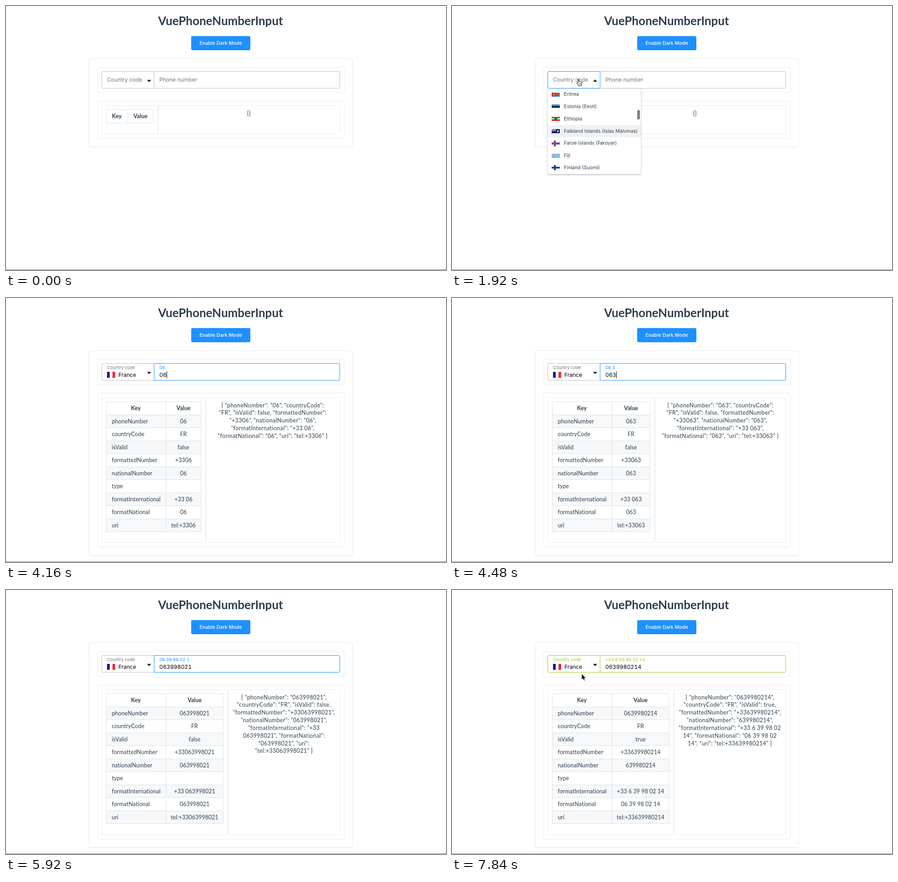
These frames come from a looping animation (967 by 579 pixels, 8 s). An HTML page:

```html
<!DOCTYPE html>
<html lang="en">
<head>
<meta charset="utf-8">
<title>VuePhoneNumberInput</title>
<style>
html, body { margin: 0; width: 100%; height: 100%; overflow: hidden; background: #fff; }
#stage { position: relative; width: 967px; height: 579px; overflow: hidden; color: #2c3e50; }
#stage div, #stage svg { position: absolute; box-sizing: border-box; }
.t { line-height: 20px; white-space: pre; font: 12.4px/20px Lato, sans-serif; letter-spacing: .1px; }
.c { transform: translateX(-50%); }
.b { font-weight: 700; }
.h1 { font-size: 26px; font-weight: 700; letter-spacing: 0; }
.ui { font: 12px/20px Inter, sans-serif; letter-spacing: 0; }
.sm { font: 9.6px/20px Inter, sans-serif; letter-spacing: 0; font-variant-numeric: tabular-nums; }
.li { font: 10.7px/20px Inter, sans-serif; letter-spacing: 0; width: 163px; overflow: hidden; text-overflow: ellipsis; }
.btn { font: 500 10.7px/20px Inter, sans-serif; letter-spacing: 0; color: #fff; }
.num { font-size: 12.2px; font-variant-numeric: tabular-nums; color: #000; }
.card { border: 1px solid #e9ebee; border-radius: 3px; }
.outer { box-shadow: 0 1px 3px rgba(0, 0, 0, .05); }
.cell { border: 1px solid #dfe2e5; }
.json { line-height: 16.85px; text-align: center; letter-spacing: .38px; }
.caret { display: inline-block; width: 1px; height: 15px; background: #000; vertical-align: -3px; }
.list { overflow: hidden; background: #fff; border-radius: 0 0 3px 3px; }
</style>
</head>
<body>
<div id="stage"></div>
<script>
const LOOP = 8000, TICK = 160, ROW = 26.75, LINE = 28.5;
const NUMBER = '0639980214';
const GRAY = [190, 190, 190], BLUE = [30, 144, 255], GREEN = [154, 205, 50];
const KEYS_AT = [4000, 4160, 4480, 4640, 4800, 4960, 5120, 5280, 5600, 6240];

const clamp = v => Math.max(0, Math.min(1, v));
const lerp = (a, b, k) => a + (b - a) * k;
const mix = (a, b, k) => `rgb(${a.map((v, i) => Math.round(lerp(v, b[i], k)))})`;
const pairs = s => s.replace(/(..)(?=.)/g, '$1 ');
const box = (x, y, w, h, cls = '', css = '', inner = '') =>
  `<div class="${cls}" style="left:${x}px;top:${y}px;width:${w}px;height:${h}px;${css}">${inner}</div>`;
const text = (x, mid, str, cls = '', css = '') =>
  `<div class="t ${cls}" style="left:${x}px;top:${mid - 10}px;${css}">${str}</div>`;
const svg = (x, y, w, h, view, inner, css = '') =>
  `<svg style="left:${x}px;top:${y}px;${css}" width="${w}" height="${h}" viewBox="${view}" preserveAspectRatio="none">${inner}</svg>`;

// Flags on an 18 x 12 field
const rect = (x, y, w, h, c) => `<rect x="${x}" y="${y}" width="${w}" height="${h}" fill="${c}"/>`;
const path = (d, c) => `<path d="${d}" fill="${c}"/>`;
const dot = (x, y, r, c) => `<circle cx="${x}" cy="${y}" r="${r}" fill="${c}"/>`;
const bars = (...cs) => cs.map((c, i) => rect(0, i * 12 / cs.length, 18, 12 / cs.length, c)).join('');
const poles = (...cs) => cs.map((c, i) => rect(i * 18 / cs.length, 0, 18 / cs.length, 12, c)).join('');
const cross = (bg, wide, thin) => rect(0, 0, 18, 12, bg) +
  rect(5, 0, 4, 12, wide) + rect(0, 4, 18, 4, wide) + rect(6, 0, 2, 12, thin) + rect(0, 5, 18, 2, thin);
const ensign = (bg, badge) => rect(0, 0, 18, 12, bg) +
  '<path d="M0 0L9 6M9 0L0 6" stroke="#fff"/>' + rect(3.5, 0, 2, 6, '#fff') + rect(0, 2, 9, 2, '#fff') +
  rect(4, 0, 1, 6, '#c8102e') + rect(0, 2.5, 9, 1, '#c8102e') + rect(12, 3.5, 3.5, 5, badge);
const FRANCE = poles('#10209a', '#fff', '#f02b3c');

const COUNTRIES = [
  ['Afghanistan (افغانستان)', 12, poles('#111', '#c22', '#197a3a') + dot(9, 6, 2, '#eee')],
  ['Albania (Shqipëri)', 12, rect(0, 0, 18, 12, '#e41e20') + path('M9 2L12 5 9 10 6 5Z', '#111')],
  ['Algeria (الجزائر)', 12, poles('#0a6a38', '#fff') + dot(9, 6, 3, '#d21034') + dot(10, 6, 2.3, '#fff')],
  ['American Samoa', 9, rect(0, 0, 18, 12, '#10246b') + path('M18 0L0 6 18 12Z', '#c22') + path('M18 1L3 6 18 11Z', '#fff')],
  ['Andorra', 12, poles('#1018a0', '#fedf00', '#d0103a') + rect(7.5, 4, 3, 4, '#b97b50')],
  ['Angola', 12, bars('#ce1126', '#111') + dot(9, 6, 2, '#f9d616')],
  ['Anguilla', 9, ensign('#12206f', '#fff')],
  ['Eritrea', 9, bars('#27a844', '#4189dd') + path('M0 0L18 6 0 12Z', '#e4203c') + dot(5, 6, 2, '#e0a72e')],
  ['Estonia (Eesti)', 11, bars('#1791dd', '#111', '#fff')],
  ['Ethiopia', 9, bars('#23914b', '#f4dc23', '#dc2030') + dot(9, 6, 3.2, '#2557a7')],
  ['Falkland Islands (Islas Malvinas)', 9, ensign('#12206f', '#ddd')],
  ['Faroe Islands (Føroyar)', 13, cross('#f4f4f6', '#2254a4', '#ee2940')],
  ['Fiji', 9, ensign('#68bfe5', '#e5b7ae')],
  ['Finland (Suomi)', 11, cross('#fff', '#123a90', '#123a90')],
  ['France', 12, FRANCE],
  ['French Guiana (Guyane française)', 12, FRANCE],
  ['French Polynesia (Polynésie française)', 12, bars('#ce1126', '#fff', '#fff', '#ce1126') + dot(9, 6, 2, '#e8a030')],
  ['Gabon', 13, bars('#3a9d3a', '#fcd116', '#3a75c4')],
];

const ARROW = '<path d="M1 1V14L4 11.4 6 16 8.2 15 6.2 10.7H10.5Z" fill="#000" stroke="#fff" stroke-width=".8"/>';
const HAND = '<path d="M4 1.5Q5.5.3 6 2V6.5Q7.5 5.3 8.2 6.8 9.8 5.9 10.3 7.5 12.5 6.8 12.4 9V12L11 16H5L1.2 10.8Q.8 8.8 2.6 9.2L4 10.6Z" fill="#fff" stroke="#000"/><path d="M6.5 10.5V13.5M8.3 10.5V13.5M10.1 10.5V13.5" stroke="#000" stroke-width=".7"/>';

// start, end, from x, from y, to x, to y, shape
const MOVES = [
  [320, 960, 505, 297, 291, 155, ARROW],
  [960, 1280, 291, 155, 273, 159, HAND],
  [2240, 2560, 273, 159, 271, 273, HAND],
  [3200, 3200, 274, 273, 274, 273, ARROW],
  [7200, 7840, 503, 199, 284, 183, ARROW],
];

function pointer(t) {
  if (t < 320 || (t >= 4000 && t < 7200)) return '';
  const [from, to, x0, y0, x1, y1, shape] = MOVES.filter(m => m[0] <= t).pop();
  const p = to > from ? clamp((t - from) / (to - from)) : 1;
  const k = p * p * (3 - 2 * p);
  return svg(lerp(x0, x1, k), lerp(y0, y1, k), 14, 17, '0 0 14 17', shape);
}

function dropdown(t) {
  if (t < 1280 || t >= 3040) return '';
  const first = t < 1920 ? 0 : t < 2080 ? 7 : 11;
  const active = first ? first + 3 : -1;
  const shown = clamp((t - 1120) / 480);
  const bar = t < 1920 ? 0 : clamp((2560 - t) / 320);
  const rows = COUNTRIES.slice(first, first + 7).map(([name, h, flag], i) => {
    const y = i * ROW, mid = y + ROW / 2;
    return (first + i === active ? box(0, y, 205, ROW, '', 'background:#f2f2f2') : '') +
      svg(9, mid - h / 2, 18, h, '0 0 18 12', flag) + text(36, mid, name, 'li');
  }).join('');
  const thumb = box(197, first === 7 ? 47 : 50, 6, 21, '', `background:#7f7f7f;border-radius:3px;opacity:${bar}`);
  return box(210, 181 - 12 * (1 - shown), 205, 187.5, 'list',
    `opacity:${shown};box-shadow:0 1px 3px rgba(0,0,0,.4)`, rows + thumb);
}

function fields(t, digits) {
  const n = digits.length, valid = n === 10;
  const chosen = t >= 3040, settled = t >= 3200;
  const open = t >= 1280 && t < 3200;
  const greenness = valid ? clamp((t - 6080) / 480) : 0;
  const focus = t < 3040 ? 0 : clamp((t - 2980) / 320);
  const left = open ? mix(GRAY, BLUE, 1) : mix(GRAY, GREEN, greenness);
  const right = valid ? mix(BLUE, GREEN, greenness) : mix(GRAY, BLUE, focus);
  const caretOn = chosen && t !== 3680 && t !== 3840 && t !== 5920 && t !== 6080 && t < 6880;
  const caret = caretOn ? '<span class="caret"></span>' : '';
  let s = box(325, 143, 409, 38, '', `border:1px solid ${right};border-radius:0 3px 3px 0`) +
    box(210, 143, 116, 38, '', `border:1px solid ${left};border-radius:3px 0 0 3px;${settled && !valid ? 'border-right:0' : ''}`);
  if (!chosen) s += text(222, 162, 'Country code', 'ui', 'color:#757575');
  else {
    s += text(settled ? 247 : 222.5, settled ? 168.5 : 162, 'France', 'ui', 'color:#000') +
      svg(221.5, 162, 18, 13, '0 0 18 12', FRANCE);
    if (settled) s += text(222, 152.5, 'Country code', 'sm', `color:${mix([117, 117, 117], GREEN, greenness)}`);
  }
  s += svg(310, open ? 161 : 161.5, 9, 5, '0 0 9 5', path(open ? 'M0 5L4.5 0 9 5Z' : 'M0 0L4.5 5 9 0Z', '#222'));
  if (!n) return s + text(337, 162, 'Phone number', 'ui', 'color:#757575') + (caret && text(336.5, 162, caret, 'ui'));
  const hint = valid ? `+33 ${digits[1]} ${pairs(digits.slice(2))}` : pairs(digits);
  return s + text(337, 152.5, hint, 'sm', `color:${right}`) + text(337, 168.5, digits + caret, 'ui num');
}

function entries(t, digits) {
  if (t < 3040) return [];
  const n = digits.length, valid = n === 10;
  const head = [['phoneNumber', digits], ['countryCode', 'FR'], ['isValid', valid]];
  if (!n) return head;
  const national = valid ? digits.slice(1) : digits;
  const spaced = valid ? `${national[0]} ${pairs(national.slice(1))}` : digits;
  return [...head,
    ['formattedNumber', '+33' + national], ['nationalNumber', national], ['type', ''],
    ['formatInternational', '+33 ' + spaced], ['formatNational', valid ? pairs(digits) : digits],
    ['uri', 'tel:+33' + national]];
}

function jsonLines(data, n) {
  if (!data.length) return '{}';
  const pairsText = data.filter(([key]) => key !== 'type').map(([key, v]) =>
    `"${key}": ${v === '' ? 'null' : typeof v === 'string' ? `"${v}"` : v}`);
  // words that begin a new line
  const breaks = !n ? [6] : n < 5 ? [4, 8, 11, 14] : n < 8 ? [3, 7, 9, 11, 14, 17] :
    n < 10 ? [3, 7, 9, 11, 13, 15, 17] : [3, 7, 9, 11, 17, 23];
  return `{ ${pairsText.join(', ')} }`.split(' ')
    .map((word, i) => (i ? breaks.includes(i) ? '\n' : ' ' : '') + word).join('');
}

function results(data, n) {
  const rows = data.length, extra = rows * LINE;
  const mid = n ? 351 : rows ? 326 : 267;
  const end = n ? 436 + 7 * (Math.min(n, 9) - 3) : rows ? 384 : 324;
  const split = end + 10, height = 62.5 + extra;
  const line = (y, h, css) => box(220, y, mid - 219, h, 'cell', css) + box(mid, y, end - mid, h, 'cell', css);
  let s = box(201, 208, 542.5, 82.5 + extra, 'card') +
    box(210, 218, split - 210, height, 'card') + box(split, 218, 733.5 - split, height, 'card') +
    line(227, 30) + text((220 + mid) / 2, 242, 'Key', 'c b') + text((mid + end) / 2, 242, 'Value', 'c b');
  data.forEach(([key, value], i) => {
    const y = 256 + i * LINE, center = y + 14.5;
    const top = Math.floor(y), bottom = Math.floor(y + LINE);
    s += line(top, bottom - top + 1, i % 2 ? '' : 'background:#f6f8fa') +
      text(232.5, center, key) + text((mid + end) / 2, center, value, 'c');
  });
  return s + text((split + 733.5) / 2, 237.5, jsonLines(data, n), 'c json');
}

function render(t) {
  const n = KEYS_AT.filter(at => at <= t).length;
  const digits = NUMBER.slice(0, n);
  const data = entries(t, digits);
  return text(471.5, 32, 'VuePhoneNumberInput', 'c h1') +
    box(407, 66, 130, 31, '', 'background:#1e90ff;border-radius:3px') +
    text(472, 82, 'Enable Dark Mode', 'c btn') +
    box(182, 115, 580, 193.5 + data.length * LINE, 'card outer') +
    box(201, 134, 542.5, 56.5, 'card') +
    results(data, n) + fields(t, digits) + dropdown(t) + pointer(t) +
    box(0, 578, 967, 1, '', 'background:#777');
}

const stage = document.getElementById('stage');
const start = performance.now();
let last = -1;
function frame() {
  const t = Math.floor((performance.now() - start) % LOOP / TICK) * TICK;
  if (t !== last) stage.innerHTML = render(last = t);
  requestAnimationFrame(frame);
}
frame();
</script>
</body>
</html>
```
